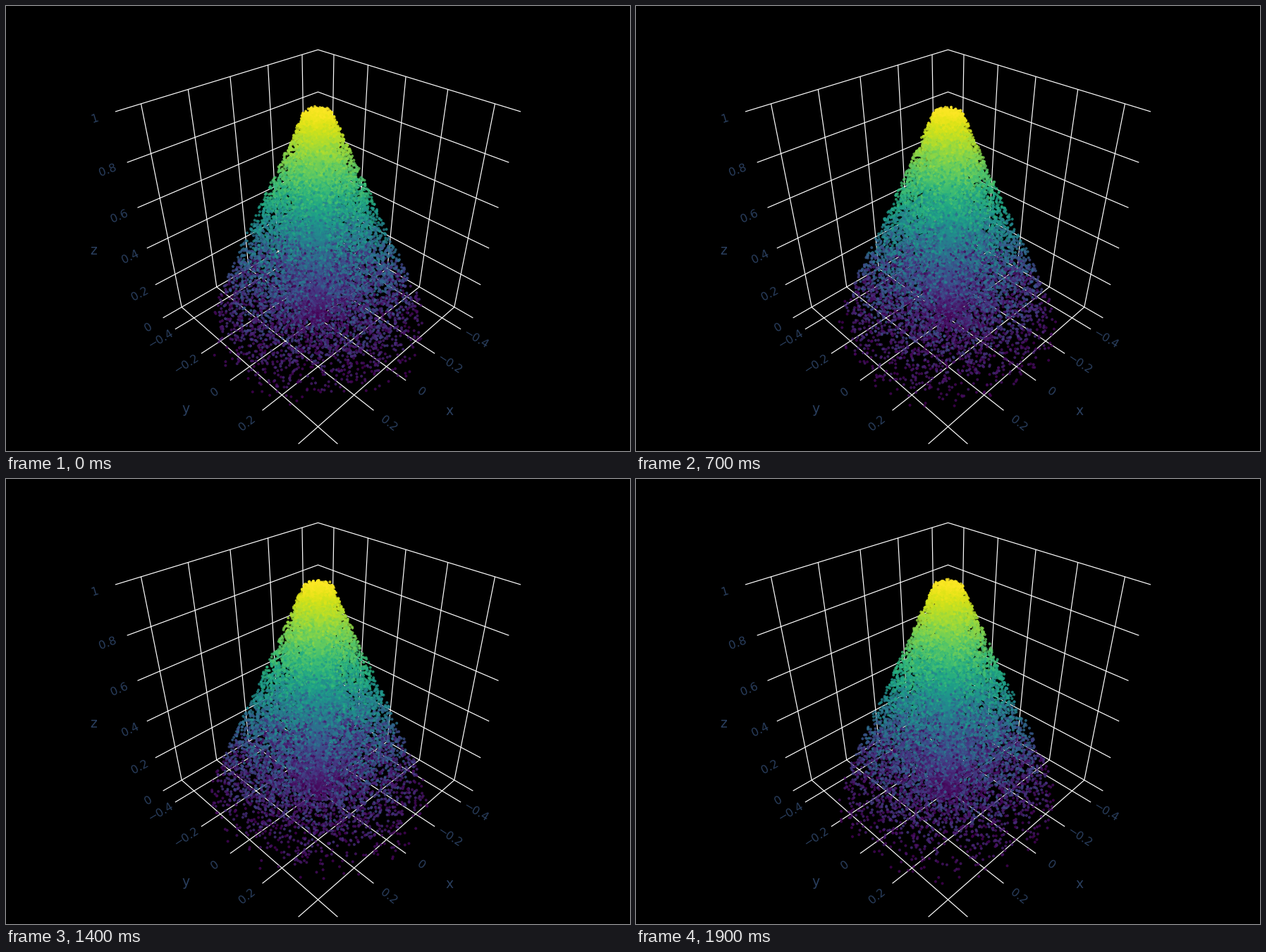
A matplotlib script that plays this animation: 885x632 px, repeating every 2000 ms.

```python
import numpy as np
import matplotlib.pyplot as plt
from matplotlib.animation import FuncAnimation
from matplotlib.collections import LineCollection

W, H, DPI = 885, 632, 64
PX = 72 / DPI                                # points per pixel
FRAMES, INTERVAL = 20, 100
COUNT = 20000
EYE = 1.25 * np.sqrt(3)                      # camera distance on the diagonal
FOCAL = H / 2 / np.tan(np.pi / 8)            # 45 degree field of view
TEXT = "#2a3f5f"
TICKS = np.array([-0.4, -0.2, 0, 0.2, 0.4])
LEVELS = np.linspace(0, 1, 6)
PAD = 0.077                                  # gap from box edge to tick label


def project(x, y, z):
    """Perspective view along (1, 1, 1); returns pixel x and pixel y."""
    h = z - 0.5
    depth = EYE - (x + y + h) / np.sqrt(3)
    u = W / 2 + FOCAL * (y - x) / np.sqrt(2) / depth
    v = H / 2 - FOCAL * (2 * h - x - y) / np.sqrt(6) / depth
    return u, v


def grid_lines():
    lines = []
    for t in TICKS:
        lines.append([project(t, 0.5, 0), project(t, -0.5, 0), project(t, -0.5, 1)])
        lines.append([project(0.5, t, 0), project(-0.5, t, 0), project(-0.5, t, 1)])
    for z in LEVELS:
        lines.append([project(0.5, -0.5, z), project(-0.5, -0.5, z),
                      project(-0.5, 0.5, z)])
    return lines


def tick_label(value, edge, spot, size=16):
    """Write a tick value centred on spot, in line with its grid line."""
    (u0, v0), (u1, v1) = project(*edge), project(*spot)
    angle = np.arctan((v0 - v1) / (u1 - u0))
    u = u1 + 0.365 * size * np.sin(angle)
    v = v1 + 0.365 * size * np.cos(angle)
    ax.text(u, v, f"{value:.1g}".replace("-", "\u2212"), color=TEXT,
            size=size * PX, ha="center", va="baseline",
            rotation=np.degrees(angle), rotation_mode="anchor")


def cloud(frame):
    """Random points filling a blunt cone: pixel positions and heights."""
    rng = np.random.default_rng(100 + frame)
    z = rng.random(COUNT)
    r = (0.5 - 0.45 * z) * rng.random(COUNT)
    a = 2 * np.pi * rng.random(COUNT)
    return np.column_stack(project(r * np.cos(a), r * np.sin(a), z)), z


plt.rcParams["font.family"] = "DejaVu Sans"
fig = plt.figure(figsize=(W / DPI, H / DPI), dpi=DPI, facecolor="black")
ax = fig.add_axes([0, 0, 1, 1])
ax.set_xlim(0, W)
ax.set_ylim(H, 0)
ax.axis("off")

ax.add_collection(LineCollection(grid_lines(), colors="white",
                                 linewidths=1.2 * PX, zorder=1))

for t in TICKS[:-1]:
    tick_label(t, (t, 0.5, 0), (t, 0.5 + PAD, 0))
    tick_label(t, (0.5, t, 0), (0.5 + PAD, t, 0))
for z in LEVELS:
    tick_label(z, (0.5, -0.5, z), (0.5 + PAD, -0.5, z))
for name, u, v in [("x", 629, 581), ("y", 255, 578.5), ("z", 124, 353)]:
    ax.text(u, v, name, color=TEXT, size=18.7 * PX, ha="center", va="baseline")

# Translucent dots in random order, so the dark core shows through the front.
xy, height = cloud(0)
dots = ax.scatter(*xy.T, c=height, cmap="viridis", vmin=0, vmax=1, alpha=0.8,
                  s=(4 * PX) ** 2, linewidths=0, zorder=2)


def update(frame):
    xy, height = cloud(frame)
    dots.set_offsets(xy)
    dots.set_array(height)
    return (dots,)


anim = FuncAnimation(fig, update, frames=FRAMES, interval=INTERVAL,
                     repeat=True, repeat_delay=0, blit=False)
plt.show()
```
